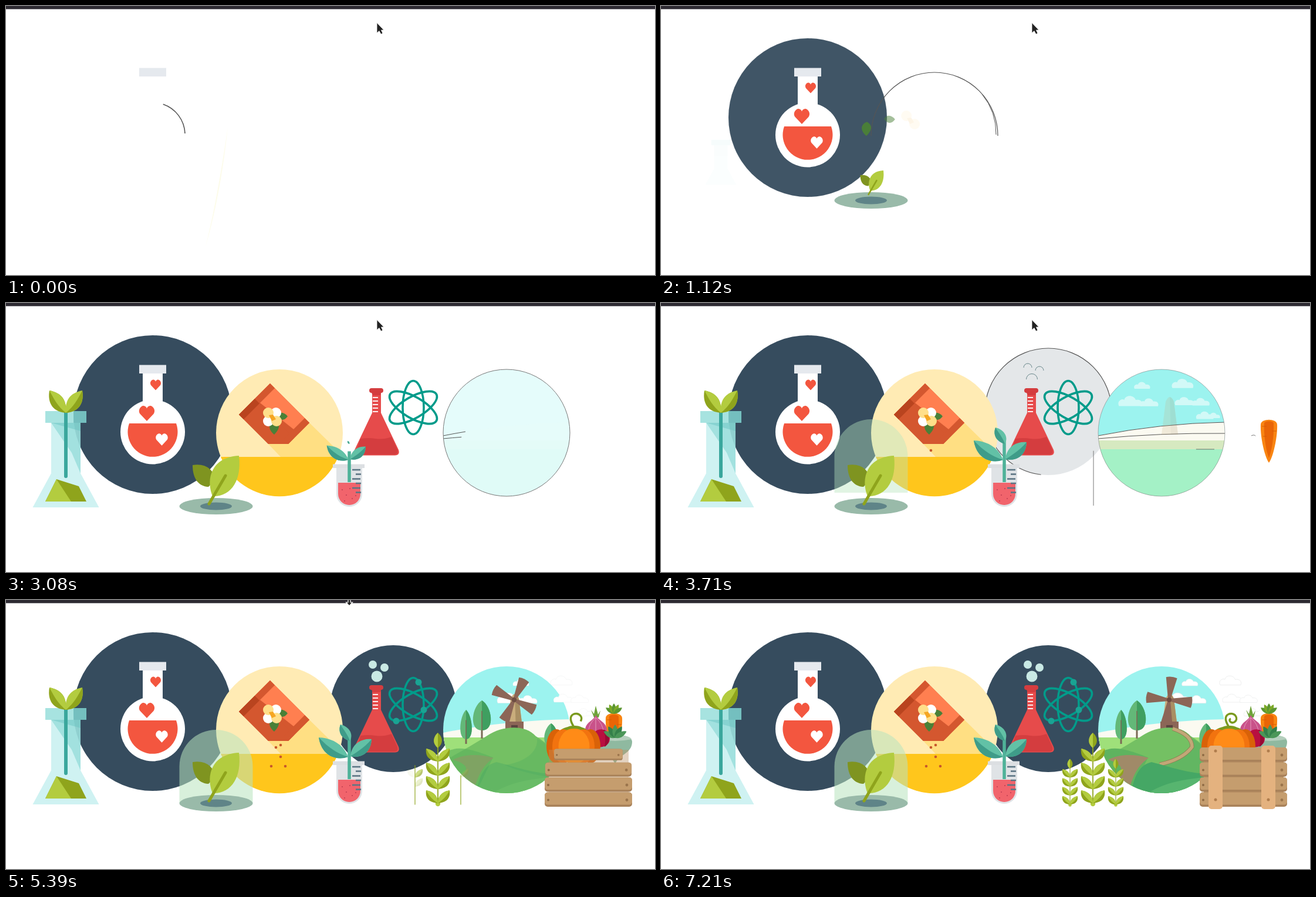
An HTML page that plays this animation: 1106 by 458 pixels, repeating every 7280 ms.

```html
<!DOCTYPE html>
<html lang="en">
<head>
<meta charset="utf-8">
<title>From lab to harvest</title>
<style>
html, body { margin: 0; width: 100%; height: 100%; overflow: hidden; background: #fff; }
svg { display: block; width: 1106px; height: 458px; }
</style>
</head>
<body>
<svg id="stage" viewBox="0 0 1106 458" fill="none"></svg>
<script>
const LOOP = 7280, STEP = 70;
const NAVY = '#364c5e', LIME = '#b3cc3f', OLIVE = '#8fa41c', TEAL = '#009b8a', INK = '#555';

/* data-a holds timed actions, times in ms:
   f fade in, o fade out, d draw a line, m move in from dx dy,
   b move in with overshoot, p grow about cx cy from a scale */
const g = (acts, inner) => `<g data-a="${acts}">${inner}</g>`;
const shape = (d, fill, more = '') => `<path d="${d}" fill="${fill}" ${more}/>`;
const dot = (x, y, r, fill, more = '') => `<circle cx="${x}" cy="${y}" r="${r}" fill="${fill}" ${more}/>`;
const oval = (x, y, rx, ry, fill) => `<ellipse cx="${x}" cy="${y}" rx="${rx}" ry="${ry}" fill="${fill}"/>`;
const box = (x, y, w, h, fill, r = 0) => `<rect x="${x}" y="${y}" width="${w}" height="${h}" rx="${r}" fill="${fill}"/>`;
const line = (d, acts, color = INK, w = 1.2) =>
  `<path d="${d}" stroke="${color}" stroke-width="${w}" pathLength="1" data-a="${acts}"/>`;
const ring = (x, y, r, acts, color, w) =>
  line(`M${x + r} ${y}A${r} ${r} 0 0 0 ${x - r} ${y}A${r} ${r} 0 0 0 ${x + r} ${y}`, acts, color, w);
const at = (x, y, s, inner) => `<g transform="translate(${x} ${y}) scale(${s})">${inner}</g>`;
const grow = (s, e, x, y, inner) => g(`p ${s} ${e} ${x} ${y} 0`, inner);

const heart = (x, y, s, fill, start) => grow(start, start + 350, x, y, at(x, y, s,
  shape('M0 9L-8 .5C-11 -4 -7 -9 -4 -9C-2 -9 0 -7 0 -5.5C0 -7 2 -9 4 -9C7 -9 11 -4 8 .5Z', fill)));

const loveFlask = () =>
  ring(250, 190, 135, 'd 70 560;o 700 1160') +
  g('f 350 1160', dot(250, 190, 135, NAVY)) +
  g('f 250 600', box(233, 119, 34, 55, '#fff') + dot(250, 219.5, 55, '#fff')) +
  line('M305 217A55 55 0 0 0 267 167V120H233V167A55 55 0 1 0 305 217', 'd -85 480;o 600 1000', INK, 1.6) +
  box(227, 105.5, 46, 14.5, '#e5e9ee') +
  g('f 300 700', shape('M210 205H290A42.5 42.5 0 1 1 210 205Z', '#f3563f')) +
  heart(255, 139.5, 1, '#f3563f', 450) + heart(240, 188, 1.45, '#f3563f', 550) +
  heart(265.5, 232.5, 1.13, '#fff', 650);

const beaker = () =>
  g('p 1000 1750 102 266 .1;f 1040 1900',
    box(67, 184, 70, 20, '#9ee0dd').replace('/>', ' fill-opacity=".9"/>') +
    shape('M77 204H127V290L158.500 348H45.500L77 290Z', '#c4efef', 'fill-opacity=".8"')) +
  g('f 1750 2200',
    shape('M115 184H137V204H115Z', '#4fa8a8', 'fill-opacity=".45"') +
    shape('M77 204H127V290L112 255Z', '#7fd3d0', 'fill-opacity=".55"') +
    shape('M77 204L127 218V204Z', '#5fbfbc', 'fill-opacity=".4"')) +
  g('f 2450 2900', shape('M67 338L86 300L124 312L137 338Z', OLIVE) +
    shape('M67 338L86 300L111 338Z', LIME)) +
  `<line id="stem" x1="102" x2="102" stroke="#3aa79d" stroke-width="6" stroke-linecap="round"/>` +
  grow(2600, 3100, 102, 187,
    shape('M102 187C76 185 71 166 74 149C95 153 104 166 102 187Z', OLIVE) +
    shape('M102 187C88 176 82 164 74 149C95 153 104 166 102 187Z', LIME) +
    shape('M102 187C100 166 109 153 130 149C133 166 128 185 102 187Z', LIME) +
    shape('M102 187C116 176 122 164 130 149C133 166 128 185 102 187Z', OLIVE));

const packet = () => g('m 2310 2900 -101 0',
  g('f 1450 1900',
    shape('M450 137L517 204L481 240H447L397 190Z', '#d4572f') +
    shape('M450 137L517 204L499 222L424 163Z', '#ff7f50') +
    shape('M424 163L491 230L481 240H447L397 190Z', '#d4572f') +
    shape('M450 137L458 145L405 198L397 190Z', '#d4572f') +
    shape('M424 163L432 171L405 198L397 190Z', '#b9441f') +
    shape('M509 196L517 204L481 240L473 232Z', '#d4572f')) +
  g('m 820 1370 -64 -30;f 780 1130', shape('M457 224C444 213 449 203 458 200C467 205 468 213 457 224Z', '#4a8038')) +
  g('m 880 1660 60 0;f 1000 1240', shape('M461 192C467 184 474 186 480 193C474 201 467 201 461 192Z', '#4a8038')) +
  g('m 1090 1700 84 0;f 1090 1390', dot(460, 187, 9, '#fff') + dot(447, 201, 9, '#fff') +
    dot(447, 187, 9, '#ffdf8a') + dot(461, 201, 9, '#ffdf8a') +
    shape('M448 191L455 190L460 198L453 201Z', '#f5a623')));

const seeds = () => [[460, 251, 3500], [468, 267, 4100], [452, 283, 4400], [476, 283, 4740], [468, 247, 5000]]
  .map(([x, y, s]) => grow(s, s + 200, x, y, dot(x, y, 2.3, '#c8582c'))).join('');

const yellowDisc = () =>
  g('f 1250 1900', dot(466, 221, 108, '#ffebb4') +
    shape('M366 262H566A108 108 0 0 1 366 262Z', '#ffc61c')) +
  g('f 1900 2350', shape('M447 240L517 204L570 256L567 262H468Z', '#ffdf83')) +
  ring(466, 221, 108, 'd 700 1540;o 1700 2500') +
  line('M571 219A106 106 0 0 0 547 150', 'd 700 1050;o 1200 1600', INK, 1) +
  line('M366 262H566', 'd 1700 2100;o 2100 2600', '#a08a40', 1);

const dome = () =>
  g('m 3570 4080 0 -60;f 3550 3760',
    shape('M295.500 346V283.500A62.500 62.500 0 0 1 420.500 283.500V346Z', '#b8e4bd', 'fill-opacity=".55"')) +
  g('m 2400 2950 0 -15', grow(250, 700, 358, 346,
    oval(358, 346, 62.5, 14, '#99baa9') + oval(358, 346, 27, 6.5, '#5f8488'))) +
  g('p 2400 3000 361 300 .5', grow(500, 900, 346, 343,
    shape('M318 276C340 272 357 285 355 303L345 313C325 312 318 295 318 276Z', '#7f9420') +
    shape('M352 329C340 300 350 262 397 260C402 300 385 330 352 329Z', LIME) +
    `<path d="M346 342L374 294" stroke="${OLIVE}" stroke-width="5" stroke-linecap="round"/>`));

const CONE = 'M624 152H639V187L669 250Q672 259 663 259.500H600Q591 259 594 250L624 187Z';
const WAVE = 'M604 231Q618 229 630 231T657 228L667 250Q669 258 662 258H601Q595 257 598 249Z';
const redFlask = () =>
  g('f 1700 2900', shape(CONE, '#e64b4b')) +
  g('f 1800 2700', shape(WAVE, '#d43d3f')) +
  line(CONE, 'd 1400 1950;o 2200 2900', '#777', 1) +
  line(WAVE, 'd 1700 2100;o 2200 2900', '#733', 1) +
  g('o 2250 2750;f 1700 2000', box(624, 153, 14, 34, '#ece8e9')) +
  g('f 2450 2900', box(619, 145, 24, 8, '#d43d3f', 4) + shape('M622 151H640L638 157H625Z', '#d43d3f') +
    [160, 166, 172, 178, 184].map(y => box(625, y, 9, 1.8, '#fff')).join(''));

const orbit = (color, w) => [0, 60, 120].map(a =>
  `<ellipse cx="694" cy="178" rx="18" ry="45.500" transform="rotate(${a} 694 178)" stroke="${color}" stroke-width="${w}" pathLength="1" data-a="d 1600 2150"/>`).join('');
const atom = () =>
  g('o 2300 2900', orbit('#777', 5) + orbit('#fff', 3.600)) +
  g('f 1800 2780', orbit(TEAL, 3.600)) +
  [[703, 140], [712, 187], [665, 206]].map(([x, y]) => grow(4050, 4500, x, y, dot(x, y, 5.500, '#1aa393'))).join('');

const bubbles = () => [[625, 110, 7], [645, 115, 7], [632, 130, 9.5]].map(([x, y, r]) =>
  ring(x, y, r, 'd 3500 3920;o 4200 4600', '#68868a', 1) +
  g('f 4050 4550', dot(x, y, r, '#c9e9e4'))).join('');

const labDisc = () =>
  g('f 3595 4450', dot(660, 185, 108, NAVY)) +
  ring(660, 185, 108, 'd 3220 3890;o 4200 4600') + redFlask() + atom() + bubbles();

const tube = () =>
  g('f 2500 3000', shape('M563 279H607V325A22 22 0 0 1 563 325Z', '#dfe3e6') +
    box(557, 274.5, 54, 6.5, '#dcdfe2') +
    shape('M566 306H604V325A19 19 0 0 1 566 325Z', '#f1646c') +
    [284, 291.5, 299.5, 307, 315, 322.5].map((y, i) => box(i % 2 ? 596 : 590, y - 1.3, i % 2 ? 9 : 14, 2.6, '#5c7684')).join('') +
    [[573, 318], [580, 327], [590, 333], [577, 337], [586, 316], [596, 328]].map(([x, y]) => dot(x, y, .9, '#b83a50')).join('')) +
  line('M585 305V230', 'd 2800 3200', '#4fb299', 5.5) +
  grow(2900, 3400, 585, 266,
    shape('M583 267C562 275 537 264 533 234C556 235 575 246 583 267Z', '#62c1a6') +
    shape('M583 267C562 275 537 264 533 234C548 250 563 261 583 267Z', '#3f9c89') +
    shape('M587 266C588 248 603 235 623 237C622 260 606 270 587 266Z', '#62c1a6') +
    shape('M587 266C600 258 613 249 623 237C622 260 606 270 587 266Z', '#3f9c89')) +
  grow(3050, 3500, 585, 240,
    shape('M586 240C572 236 565 225 570 212C584 215 593 228 586 240Z', '#62c1a6') +
    shape('M586 240C572 236 565 225 570 212C576 222 583 230 586 240Z', '#3f9c89'));

const CLOUD = 'M-13 5C-16 -1 -9 -4 -7 -2C-6 -8 4 -8 6 -2C11 -3 15 0 13 5Z';
const clouds = () => `<g id="clouds">` + g('f 3380 3980',
  [[820, 141, 1], [889, 138, 1.35], [800, 168, 1.5], [832, 170, 1.15], [892, 168, 1.2], [920, 169, 1.1], [927, 192, 1.1], [942, 192, .8]]
    .map(([x, y, s]) => at(x, y, s, shape(CLOUD, '#fff') +
      g('f 4900 5900', `<path d="${CLOUD}" stroke="#e9eaea" stroke-width=".6"/>`))).join('')) + '</g>';

const tree = (x, top, w, h, foot, s, e) => grow(s, e, x, foot,
  box(x - 1.5, top + h * .5, 3, foot - top - h * .5, '#7b6a55') +
  shape(`M${x} ${top}C${x + w * .55} ${top + h * .2} ${x + w * .75} ${top + h} ${x} ${top + h}C${x - w * .75} ${top + h} ${x - w * .55} ${top + h * .2} ${x} ${top}Z`, '#63b878') +
  shape(`M${x} ${top}C${x + w * .55} ${top + h * .2} ${x + w * .75} ${top + h} ${x} ${top + h}Z`, '#3f9f60') +
  box(x - .8, top + h * .35, 1.6, h * .65, '#7b6a55'));

const windmill = () =>
  g('f 3570 4270', shape('M853 224L860 168Q867 152 874 168L881 224Z', '#c9ad7c') +
    shape('M867 160Q872 162 874 168L881 224H869Z', '#a98f63')) +
  g('f 4200 4550', box(851, 207, 31, 23, '#8c6657') + box(861, 213, 11, 17, '#5b4440')) +
  `<g id="blades">` + grow(4200, 4600, 0, 0,
    [0, 90, 180, 270].map(a => `<path d="M-2.500 -3L-9.500 -38Q0 -41 9.500 -38L2.500 -3Z" fill="#8c6657" transform="rotate(${a})"/>`).join('') +
    dot(0, 0, 4, '#6d4d42')) + '</g>';

const hills = () => `<g clip-path="url(#land)">` +
  g('f 4690 5300', shape('M745 275C775 258 800 244 820 231C845 214 885 211 903 232C925 245 935 262 965 270V335H745Z', '#74c063')) +
  g('f 5000 5600', shape('M745 262C765 248 785 250 830 268L800 330H745Z', '#5fb35f') +
    shape('M905 236C920 242 935 262 965 270V310C920 300 880 295 850 281C890 275 907 255 905 236Z', '#62b662')) +
  g('f 5100 5750', shape('M762 272C780 262 808 262 831 269C815 280 806 294 798 322L770 300C790 292 790 280 762 272Z', '#a08a68')) +
  line('M850 280Q890 271 905 250Q905 230 872 219', 'd 5500 6500', '#8a7a50', 7) +
  line('M850 280Q890 271 905 250Q905 230 872 219', 'd 5500 6500', '#c2a777', 5.5) +
  g('f 5150 5800', shape('M800 335C805 302 815 280 836 276C870 284 905 300 965 296V335Z', '#45a765') +
    shape('M822 335C850 312 890 303 965 299V335Z', '#57b56f') +
    shape('M745 285C775 292 790 305 806 335H745Z', '#4dab62')) + '</g>';

const farmDisc = () =>
  `<clipPath id="land"><circle cx="853" cy="221" r="108"/></clipPath>` +
  g('f 2950 3450', dot(853, 221, 108, '#9cf3ef')) + clouds() +
  `<g clip-path="url(#land)">` +
  g('f 3050 3500', shape('M745 226Q850 205 961 203V240H745Z', '#fbfaf1') +
    box(745, 234, 216, 95, '#d6e9c0') + box(745, 249, 216, 80, '#a4f1c6')) +
  g('f 3750 4500', box(745, 234, 216, 95, '#9fe07a')) +
  line('M745 226Q850 205 961 203', 'd 3000 3450;o 3900 4500', INK, 1) +
  line('M745 231Q850 221 961 222', 'd 3000 3550;o 3900 4500', INK, 1) +
  line('M943 249H745', 'd 3600 4300;o 4100 4500', INK, .8) + '</g>' +
  ring(853, 221, 108, 'd 2650 3080;o 3300 4200', '#777', 1) + windmill() +
  tree(784, 187, 20, 50, 245, 4000, 4500) + tree(811, 171, 31, 51, 236, 4100, 4800) +
  tree(929, 210, 24, 40, 259, 4050, 4550) + hills();

const EAR = 'M0 0C0 -14 9 -20 20 -22C22 -8 14 -1 0 0Z';
const ear = (side, y, s) => `<g transform="translate(736 ${y}) scale(${side} 1)">` +
  g(`f ${s} ${s + 220}`, shape(EAR, OLIVE) + shape('M0 0C0 -14 9 -20 20 -22C15 -12 9 -6 0 0Z', LIME)) + '</g>';
const wheat = (from, split) =>
  line('M736 346V240', `d ${from} ${from + 400}`, OLIVE, 1.8) +
  g(`f ${from + 500} ${from + 800}`, dot(736, 347, 4.2, LIME) +
    shape('M736 252C725 243 729 232 736 226C743 232 747 243 736 252Z', OLIVE) +
    shape('M736 252C725 243 729 232 736 226Z', LIME)) +
  [275, 299, 322, 346].map((y, i) => ear(1, y, from + split + i * 85) + ear(-1, y, from + split * 1.5 + i * 85)).join('');
const wheats = () =>
  line('M737 345V240', 'd 3350 3755;o 4100 4400', '#777', 1) + wheat(3800, 600) +
  `<g transform="translate(218.600 123.500) scale(.65)">${wheat(5000, 250)}</g>` +
  `<g transform="translate(296.600 123.500) scale(.65)">${wheat(5100, 250)}</g>`;

const segment = (dx, rx, color) => g(`m 4790 5250 ${-dx} 0;f 4780 4860', `.slice(0, -3), oval(967 + dx, 249, rx, 29, color));
const veg = () =>
  line('M1006 226Q1012 223 1014 228', 'd 3500 3750;o 3800 4100', '#777', 1) +
  g('f 3350 3650;m 4000 4500 0 6', shape('M1022 201C1022 190 1050 190 1050 201C1051 220 1044 255 1036 266C1028 255 1021 220 1022 201Z', '#f98512') +
    shape('M1028 199C1028 194 1044 194 1044 199C1045 220 1041 245 1036 258C1031 245 1027 220 1028 199Z', '#e96506') +
    `<path d="M1024 204H1032M1041 212H1049M1026 221H1032" stroke="#d85c05" stroke-width="1.2"/>`) +
  grow(4100, 4500, 1036, 195, [-55, -28, 0, 28, 55].map(a =>
    `<path d="M1036 194C1031 188 1032 181 1036 176C1040 181 1041 188 1036 194Z" fill="${a % 55 ? '#7da928' : '#5b9632'}" transform="rotate(${a} 1036 193)"/>`).join('')) +
  grow(4100, 4650, 1038, 245,
    shape('M1010 241C1010 226 1067 226 1067 241C1067 262 1045 262 1038 279C1031 262 1010 262 1010 241Z', '#8fb9a0') +
    shape('M1011 237C1015 227 1062 227 1066 237Q1038 243 1011 237Z', '#b5cfbd')) +
  line('M1006 196Q1002 174 1010 157', 'd 4500 4800;o 4950 5200', '#8fb96a', 1.2) +
  g('f 5000 5350', shape('M1005 180L1009 195L1013 188L1010 200H1002L997 187L1002 194Z', '#6fa33a') +
    shape('M1005 196C1010 206 1024 208 1024 222V240H987V222C987 208 1001 206 1005 196Z', '#c9528a') +
    `<path d="M1005 200Q992 212 993 225M1005 200V225M1005 200Q1018 212 1018 225" stroke="#e39ab9" stroke-width="1"/>`) +
  g('p 4600 5200 1008 228 .2;f 4600 4740', shape('M998 237C998 216 1029 214 1029 236C1029 254 998 256 998 237Z', '#b90f40') +
    shape('M1018 221C1028 223 1032 244 1020 250C1022 240 1022 230 1018 221Z', '#970a33')) +
  grow(4200, 4650, 1038, 235, [-62, -32, 0, 32, 62].map(a =>
    `<path d="M1038 235C1031 228 1033 218 1038 212C1043 218 1045 228 1038 235Z" fill="${a % 62 ? '#34804a' : '#4b9658'}" transform="rotate(${a} 1038 234)"/>`).join('')) +
  grow(4150, 4600, 968, 226, oval(968, 225, 24, 10, '#7a9a1f')) +
  segment(-29, 17, '#d96208') + segment(29, 17, '#d96208') +
  segment(-17, 19, '#f2730f') + segment(17, 19, '#f2730f') +
  grow(4150, 4650, 968, 249, oval(968, 249, 26.5, 30.5, '#ff8b17')) +
  g('f 5000 5300', shape('M952 221Q958 213 968 214Q980 213 985 221Q968 217 952 221Z', '#7a9a1f')) +
  line('M969 218C963 209 958 198 968 194C979 191 985 203 977 208C971 211 966 204 971 202', 'd 5050 5500', '#7a9a1f', 3.5);

const board = (y, s) => grow(s, s + 350, 992, y + 12,
  box(918, y, 149, 24.5, '#a9825a', 5) + box(918, y, 149, 21, '#c59d6e', 5) +
  dot(924, y + 13, 2, '#8f6b45') + dot(1058, y + 13, 2.4, '#9a744c'));
const post = (x, s) => g(`b ${s} ${s + 330} 0 -70;f ${s} ${s + 80}`,
  box(x, 248, 24, 108, '#e4b27f', 5) + dot(x + 12, 257, 2.5, '#b07d4d') + dot(x + 12, 340, 2.5, '#b07d4d'));
const crate = () => g('f 5250 5600', box(925, 255, 136, 94, '#b88f62')) +
  [251, 276.5, 302, 327.5].map((y, i) => board(y, 5250 - i * 130)).join('') +
  post(933, 5880) + post(1023, 6230);

const chrome = () =>
  box(0, 0, 1106, 5, '#2d2a32') + box(0, 5, 1106, .8, '#9c9a9f') +
  `<g id="arrow"><path d="M632 28.500V46L636 42.500L639 48L642 46.500L639.500 41H644Z" fill="#222" stroke="#fff" stroke-width=".8"/></g>` +
  `<path id="pull" d="M583 -2V4H579.500L585 10L590.500 4H587V-2Z" fill="#222" stroke="#fff" stroke-width="1.200"/>`;

const stage = document.getElementById('stage');
stage.innerHTML = g('o 0 700', shape('M378 206Q366 320 340 410Q360 330 378 206Z', '#fdfcea')) +
  loveFlask() + beaker() + labDisc() + yellowDisc() + packet() + seeds() + dome() + tube() +
  farmDisc() + wheats() + veg() + crate() + chrome();

const ramp = (t, a, b) => Math.min(1, Math.max(0, (t - a) / (b - a)));
const out = p => 1 - (1 - p) ** 3;
const back = p => 1 + 2.70158 * (p - 1) ** 3 + 1.70158 * (p - 1) ** 2;
const parts = [...stage.querySelectorAll('[data-a]')].map(el => ({
  el,
  acts: el.dataset.a.split(';').map(a => {
    const [kind, ...n] = a.trim().split(' ');
    return [kind, ...n.map(Number)];
  })
}));
const id = name => document.getElementById(name);
const [stem, cloudBox, blades, arrow, pull] = ['stem', 'clouds', 'blades', 'arrow', 'pull'].map(id);

function pose({ el, acts }, t) {
  let alpha = 1, move = '';
  for (const [kind, s, e, x, y, from] of acts) {
    const p = ramp(t, s, e);
    if (kind === 'f') alpha *= p;
    else if (kind === 'o') alpha *= 1 - p;
    else if (kind === 'd') {
      if (!p) alpha = 0;
      el.setAttribute('stroke-dasharray', p < 1 ? `${p} 2` : 'none');
    } else if (kind === 'p') {
      const k = from + (1 - from) * out(p);
      if (!k) alpha = 0;
      move += `translate(${x * (1 - k)} ${y * (1 - k)}) scale(${k})`;
    } else {
      const left = 1 - (kind === 'b' ? back(p) : out(p));
      move += `translate(${x * left} ${y * left})`;
    }
  }
  el.setAttribute('opacity', alpha);
  if (move) el.setAttribute('transform', move);
}

function draw(t) {
  parts.forEach(part => pose(part, t));
  const p = ramp(t, 2170, 2520);
  stem.setAttribute('y1', 251 - 66 * p);
  stem.setAttribute('y2', 282 + 13 * p);
  stem.setAttribute('opacity', t < 2170 ? 0 : .25 + .75 * p);
  const drift = 95 * (1 - Math.exp(-Math.max(0, t - 3710) / 1800));
  cloudBox.setAttribute('transform', `translate(${drift} 0)`);
  blades.setAttribute('transform', `translate(866 170) rotate(${2 + .0385 * (t - 4760)})`);
  const q = ramp(t, 4480, 4690);
  arrow.setAttribute('transform', `translate(${-47 * q} ${-24 * q})`);
  arrow.setAttribute('opacity', q < 1 ? 1 : 0);
  pull.setAttribute('opacity', t >= 4690 && t < 5480 ? 1 : 0);
}

const start = performance.now();
function tick() {
  const t = (performance.now() - start) % LOOP;
  draw(Math.floor(t / STEP) * STEP);
  requestAnimationFrame(tick);
}
tick();
</script>
</body>
</html>
```
